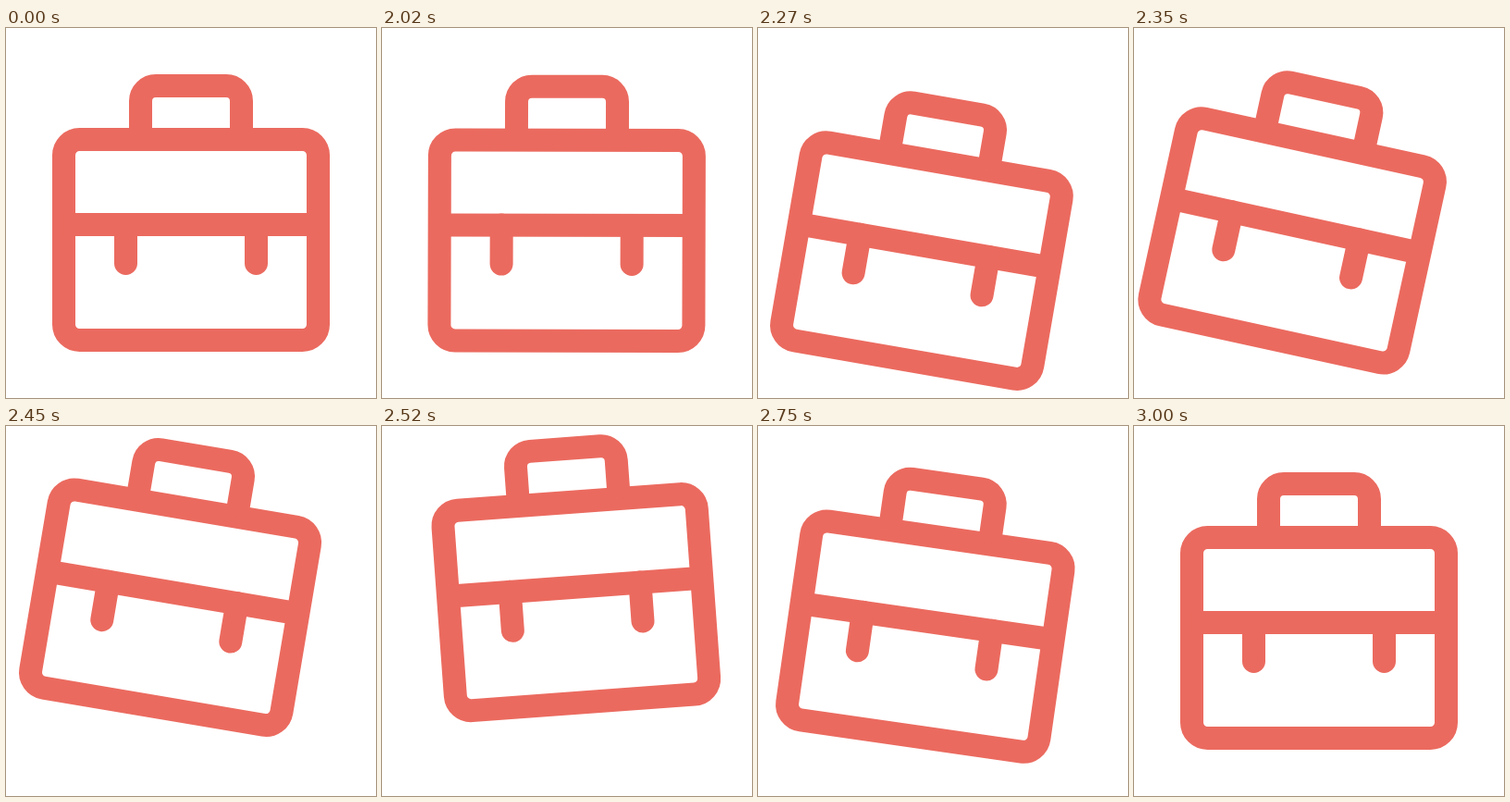
An HTML page for the animation above (3.02 s loop, 400 by 400 pixels).

```html
<!DOCTYPE html>
<html lang="en">
<head>
<meta charset="utf-8">
<title>Briefcase</title>
<style>
html, body { margin: 0; width: 100%; height: 100%; overflow: hidden; background: #fff; }
svg { display: block; width: 100%; height: 100%; }
</style>
</head>
<body>
<svg viewBox="0 0 400 400">
  <g id="bag" fill="none" stroke="#eb6a5f" stroke-width="25">
    <rect x="62.5" y="120.5" width="275" height="217" rx="17"/>
    <path d="M62.5 212.5H337.5M145.5 120V79a16.5 16.5 0 0 1 16.5-16.5h76a16.5 16.5 0 0 1 16.5 16.5V120"/>
    <path stroke-linecap="round" d="M129.5 212.5V254.5M270.5 212.5V254.5"/>
  </g>
</svg>
<script>
const LOOP = 3020, REST = 2020, STEP = 25, STEPS = 40;
const bag = document.getElementById('bag');

// Keys are [progress, value]
const swing = [[0, 0], [.405, 13], [.605, -13.5], [.78, 10], [1, 0]];
const jump = [[0, 0], [.25, 26.4], [.502, -38], [.528, -38], [.75, 0], [1, 0]];

function ease(keys, u) {
  const i = Math.max(1, keys.findIndex(([at]) => at >= u));
  const [a, from] = keys[i - 1], [b, to] = keys[i];
  const x = (u - a) / (b - a);
  return from + (to - from) * x * x * (3 - 2 * x);
}

function draw(now) {
  const t = now % LOOP;
  const u = t < REST ? 0 : Math.min(1, (Math.floor((t - REST) / STEP) + 1) / STEPS);
  bag.setAttribute('transform', `translate(0 ${ease(jump, u)}) rotate(${ease(swing, u)} 200 94)`);
}

const start = performance.now();
function tick() {
  draw(performance.now() - start);
  requestAnimationFrame(tick);
}
tick();
</script>
</body>
</html>
```
